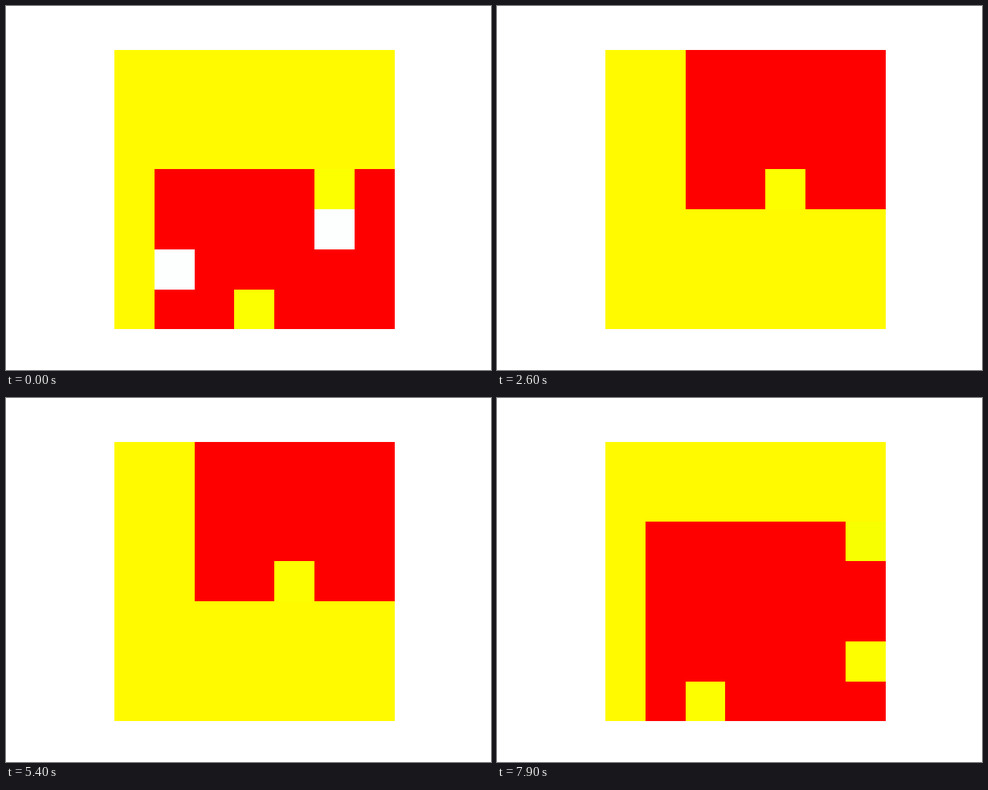
Recreate the animation shown at these times as an HTML page with a canvas. Size 640 by 480 pixels, loop 8 s.

```html
<!DOCTYPE html>
<html>
<head>
<meta charset="utf-8">
<style>
html, body { margin: 0; width: 100%; height: 100%; overflow: hidden; background: #fff; }
canvas { display: block; }
</style>
</head>
<body>
<canvas id="stage" width="640" height="480"></canvas>
<script>
const ctx = document.getElementById('stage').getContext('2d');
const WALL = '#fffa00', FLOOR = '#ff0000', KEY = '#fcff00', GOAL = '#f8ff00', LOCKED = '#fcfffe', OPEN = '#fdff00';
const STEP = 100, STEPS = 80, SIZE = 7;

// P pick up, T open door, F forward, L / R turn; afterwards it keeps turning left
const ACTIONS = 'PRFLTRFFLFFPFFFLTLLF'.padEnd(STEPS, 'L');
const DIRS = [[1, 0], [0, 1], [-1, 0], [0, -1]];

const edgeX = k => Math.floor(143.4 + 52.8 * k);
const edgeY = k => Math.max(58, Math.floor(57.4 + 52.8 * k));

// The room after a number of actions
function roomAt(steps) {
  const items = { '2,1': KEY, '4,4': KEY, '2,2': LOCKED, '6,3': LOCKED, '6,6': GOAL };
  let x = 1, y = 1, dir = 0, carrying = false;
  for (const action of ACTIONS.slice(0, steps)) {
    const [dx, dy] = DIRS[dir];
    const front = [x + dx, y + dy];
    if (action === 'L') dir = (dir + 3) % 4;
    if (action === 'R') dir = (dir + 1) % 4;
    if (action === 'F') [x, y] = front;
    if (action === 'P') { delete items[front]; carrying = true; }
    if (action === 'T') { items[front] = OPEN; carrying = false; }
  }
  return { items, x, y, dir, carrying };
}

// The agent stands at the right edge of its view, looking left
function draw(step) {
  const { items, x, y, dir, carrying } = roomAt(step);
  const [dx, dy] = DIRS[dir];
  const inside = v => v >= 1 && v <= 6;
  ctx.fillStyle = '#fff';
  ctx.fillRect(0, 0, 640, 480);
  for (let row = 0; row < SIZE; row++) {
    for (let col = 0; col < SIZE; col++) {
      const ahead = 6 - col, side = row - 3;
      const cx = x + ahead * dx - side * dy;
      const cy = y + ahead * dy + side * dx;
      let color = inside(cx) && inside(cy) ? items[[cx, cy]] || FLOOR : WALL;
      if (!ahead && !side) color = carrying ? KEY : FLOOR;
      ctx.fillStyle = color;
      ctx.fillRect(edgeX(col), edgeY(row), edgeX(col + 1) - edgeX(col), edgeY(row + 1) - edgeY(row));
    }
  }
}

const start = performance.now();
function tick() {
  draw(Math.floor((performance.now() - start) / STEP) % STEPS);
  requestAnimationFrame(tick);
}
tick();
</script>
</body>
</html>
```
